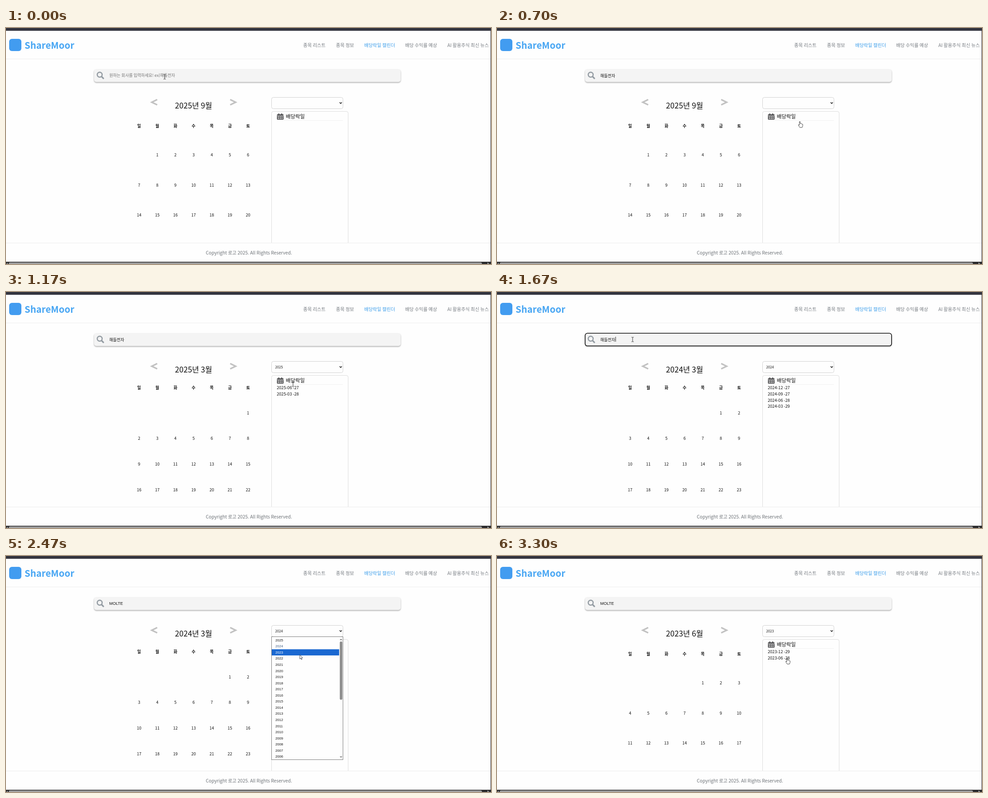
Animation of 1073x522 px, one loop 3.37 s. Source, as an HTML page with a canvas:

```html
<!DOCTYPE html>
<html lang="ko">
<head>
<meta charset="utf-8">
<title>배당락일 캘린더</title>
<style>
  html, body { margin: 0; width: 100%; height: 100%; overflow: hidden; background: #fefefe; }
  canvas { display: block; width: 100vw; height: 100vh; }
</style>
</head>
<body>
<canvas id="stage" width="1073" height="522"></canvas>
<script>
const ctx = document.getElementById('stage').getContext('2d');
const W = 1073, H = 522, LOOP = 3370;
const KR = '"Noto Sans CJK KR", "Noto Sans CJK", "Noto Sans", sans-serif';
const ARIAL = '"Liberation Sans", "Noto Sans CJK KR", sans-serif';
const FOOT = 475;

const BRAND = 'ShareMoor';
const COMPANY_A = '해들전자', COMPANY_B = 'MOLTE';
const LIST_A = ['해들전자', '해들물산', '해들생명', '해들화재', '해들카드'];
const LIST_B = ['GMZ금융지주', COMPANY_B, 'MQ투자증권', 'MQ하늘숲리츠', 'MEDO'];

const years = (from, skip) =>
  Array.from({ length: 24 }, (_, i) => from - i).filter(y => !skip.includes(y)).slice(0, 20);
const YEARS_A = { items: years(2025, []), thumb: 129 };
const YEARS_B = { items: years(2025, [2024, 2010]), thumb: 218 };

const DATES_2025 = ['2025-06 -27', '2025-03 -28'];
const DATES_2024 = ['2024-12 -27', '2024-09 -27', '2024-06 -28', '2024-03 -29'];
const DATES_B = ['2025-02 -27'];
const DATES_2023 = ['2023-12 -29', '2023-06 -28'];

const at = (kind, x, y) => ({ kind, x, y });

// Each entry changes some of the state; the rest carries over.
const timeline = [
  [0, { query: '', focus: false, hints: null, year: '', dates: [], month: [2025, 9],
        options: null, hover: 0, old: 0, mouse: at('text', 351, 108) }],
  [70, { focus: true }],
  [140, { query: 'ㅎ', mouse: null }],
  [210, { query: '해', hints: LIST_A }],
  [280, { query: '해들' }],
  [350, { query: '해들저' }],
  [420, { query: COMPANY_A }],
  [490, { mouse: at('arrow', 318, 112) }],
  [560, { mouse: at('hand', 300, 132) }],
  [630, { focus: false, hints: null, mouse: at('arrow', 500, 172) }],
  [700, { mouse: at('hand', 670, 207) }],
  [770, { year: '2025', dates: DATES_2025, mouse: at('hand', 641, 210) }],
  [900, { month: [2025, 6] }],
  [970, { mouse: at('hand', 637, 222) }],
  [1040, { month: [2025, 3] }],
  [1170, { mouse: at('text', 635, 204) }],
  [1240, { options: YEARS_A, hover: 2025, mouse: at('arrow', 650, 172) }],
  [1300, { hover: 2024, mouse: at('arrow', 650, 197) }],
  [1370, { options: null, year: '2024', dates: DATES_2024 }],
  [1440, { mouse: at('hand', 640, 247) }],
  [1500, { month: [2024, 3] }],
  [1600, { mouse: at('arrow', 500, 150) }],
  [1670, { focus: true, mouse: at('text', 300, 105) }],
  [1730, { query: '', mouse: at('arrow', 120, 102) }],
  [1800, { mouse: at('arrow', -4, 94) }],
  [1930, { query: 'M', hints: LIST_B }],
  [2060, { query: 'MO' }],
  [2190, { mouse: at('hand', 240, 157) }],
  [2260, { query: COMPANY_B, focus: false, hints: null, mouse: at('arrow', 300, 158) }],
  [2330, { mouse: at('arrow', 590, 165) }],
  [2400, { options: YEARS_A, hover: 2024, mouse: at('arrow', 650, 188) }],
  [2470, { hover: 2023, old: 2024, mouse: at('arrow', 650, 218.5) }],
  [2540, { options: null, old: 0, year: '2025', dates: DATES_B }],
  [2610, { mouse: at('hand', 640, 209) }],
  [2680, { month: [2025, 2] }],
  [2750, { mouse: at('arrow', 647, 172) }],
  [2820, { options: YEARS_B, hover: 2025, mouse: at('arrow', 650, 184) }],
  [2880, { mouse: at('arrow', 650.5, 196.5) }],
  [2950, { hover: 2023 }],
  [3020, { options: null, year: '2023', dates: DATES_2023, mouse: at('hand', 642, 209) }],
  [3090, { month: [2023, 12] }],
  [3160, { mouse: at('hand', 642, 226) }],
  [3230, { month: [2023, 6] }]
];

function stateAt(t) {
  return Object.assign({}, ...timeline.filter(([start]) => start <= t).map(([, patch]) => patch));
}

// y is the middle of the glyphs.
function label(str, x, y, size, color = '#111', { align = 'left', font = KR, weight = 400 } = {}) {
  ctx.font = `${weight} ${size}px ${font}`;
  ctx.textAlign = align;
  ctx.fillStyle = color;
  ctx.fillText(str, x, y + size * 0.36);
}

function rect(x, y, w, h, color) {
  ctx.fillStyle = color;
  ctx.fillRect(x, y, w, h);
}

function box(x, y, w, h, r, fill, stroke, line = 1) {
  ctx.beginPath();
  ctx.roundRect(x, y, w, h, r);
  if (fill) { ctx.fillStyle = fill; ctx.fill(); }
  if (stroke) { ctx.strokeStyle = stroke; ctx.lineWidth = line; ctx.stroke(); }
}

function path(points, { fill, stroke, line = 1, close = false }) {
  ctx.beginPath();
  points.forEach(([x, y]) => ctx.lineTo(x, y));
  if (close) ctx.closePath();
  if (fill) { ctx.fillStyle = fill; ctx.fill(); }
  if (stroke) { ctx.strokeStyle = stroke; ctx.lineWidth = line; ctx.stroke(); }
}

function triangle(x, y, dir, color = '#808080') {
  path([[x - 3, y + 1.5 * dir], [x + 3, y + 1.5 * dir], [x, y - 1.5 * dir]], { fill: color });
}

function shadowed(draw, color, blur, dy) {
  ctx.save();
  ctx.shadowColor = color;
  ctx.shadowBlur = blur;
  ctx.shadowOffsetY = dy;
  draw();
  ctx.restore();
}

function drawHeader() {
  rect(0, 68, W, 1, '#eeeeee');
  box(7, 24, 27, 27, 6, '#429cf0');
  label(BRAND, 41, 38.5, 20.4, '#48a6f3', { weight: 700 });
  const menu = [['종목 리스트', 657.5], ['종목 정보', 730], ['배당락일 캘린더', 792.5],
                ['배당 수익률 예상', 883], ['AI 활용주식 최신 뉴스', 976.5]];
  menu.forEach(([name, x], i) => label(name, x, 38, 10.25, i === 2 ? '#3f9fea' : '#777c82'));
}

function drawFrame() {
  rect(0, 0, W, 6, '#34353f');
  rect(0, 6, W, 1, '#d9d9dc');
  rect(1072, 0, 1, H, '#34353f');
  rect(0, 517, W, 5, '#2b2b2d');
  box(6, 518.5, 1047, 6, 3, '#9f9f9f');
  path([[1065, 518.5], [1069, 521], [1065, 523.5]], { fill: '#9f9f9f' });
  path([[4, 519], [1, 521], [4, 523]], { fill: '#9f9f9f' });
}

function drawFooter() {
  rect(0, FOOT, W, 42, '#fefefe');
  rect(0, FOOT, W, 1, '#ececec');
  label('Copyright 로고 2025. All Rights Reserved.', 537.5, 497, 10.2, '#6d7277', { align: 'center' });
}

function drawSearch(s) {
  shadowed(() => box(195, 91.5, 678, 28, 5, '#f4f4f4'), 'rgba(0,0,0,.35)', 3, 1.5);
  if (s.focus) box(195, 91.3, 678, 28, 5, '#f4f4f4', '#101010', 1.6);

  ctx.strokeStyle = '#959da4';
  ctx.lineWidth = 2.6;
  ctx.beginPath();
  ctx.arc(207.3, 103.3, 5.4, 0, Math.PI * 2);
  ctx.stroke();
  path([[211, 107], [216.3, 112.3]], { stroke: '#959da4', line: 3.2 });

  if (!s.query) {
    label('원하는 회사를 입력하세요! ex)' + COMPANY_A, 228.5, 104.5, 9, '#757575');
    ctx.font = `9px ${ARIAL}`;
  } else {
    const latin = s.query < '~';
    label(s.query, 228.5, latin ? 104.5 : 105.5, 9, '#111', { font: ARIAL });
  }
  if (s.focus) {
    rect(Math.round(228.5 + ctx.measureText(s.query).width), 99, 1, 11, '#222');
  }
}

function drawHints(items) {
  const rowH = 25.4, top = 120, bottom = 232;
  shadowed(() => box(195.5, top, 677, bottom - top, [0, 0, 4, 4], '#fefefe'), 'rgba(0,0,0,.4)', 4, 1);
  ctx.save();
  ctx.beginPath();
  ctx.rect(195, top, 678, bottom - top);
  ctx.clip();
  items.forEach((name, i) => {
    label(name, 201, 132.8 + i * rowH, 9);
    rect(196, Math.round(145 + i * rowH), 668, 1, '#f3f3f3');
  });
  box(865.5, 130, 5.5, 57.5, 2.7, '#8b8b8b');
  triangle(868.2, 125, 1);
  triangle(868.2, 226.5, -1);
  ctx.restore();
}

function drawCalendar([year, month]) {
  const first = new Date(year, month - 1, 1).getDay();
  const days = new Date(year, month, 0).getDate();
  const tall = Math.ceil((first + days) / 7) < 6;
  const [head, top, step] = tall ? [216.3, 281, 66.4] : [211.8, 267.6, 56.6];
  const colX = i => 294.5 + i * 40.17;

  path([[334.5, 158.3], [322.5, 164.2], [334.5, 170]], { stroke: '#c2c2c2', line: 3.4 });
  path([[496, 158.3], [508, 164.2], [496, 170]], { stroke: '#c2c2c2', line: 3.4 });
  label(`${year}년 ${month}월`, 415, 172.3, 17, '#111', { align: 'center' });
  [...'일월화수목금토'].forEach((d, i) => label(d, colX(i), head, 9, '#111', { align: 'center', weight: 700 }));
  for (let d = 1; d <= days; d++) {
    const cell = first + d - 1;
    const y = top + Math.floor(cell / 7) * step;
    if (y < FOOT) label(d, colX(cell % 7), y, 9, '#111', { align: 'center' });
  }
}

function drawPanel(s) {
  box(587.5, 153.5, 158, 25, 4, '#fefefe', '#d2d2d2');
  label(s.year, 595.5, 166, 7.6);
  path([[738, 164.5], [740.5, 167], [743, 164.5]], { stroke: '#111', line: 1.5 });

  box(587.5, 184.5, 169.5, 310, 4, '#fefefe', '#dcdcdc');
  drawCalendarIcon(599.5, 189);
  label('배당락일', 619, 196.2, 11.4);
  rect(599, 204, 146, 1, '#f1f1f1');
  s.dates.forEach((d, i) => label(d, 599, 212.2 + i * 13.6, 9.1));
}

function drawCalendarIcon(x, y) {
  const ink = '#4b4b4d';
  rect(x + 3, y, 2, 3, ink);
  rect(x + 9.5, y, 2, 3, ink);
  box(x, y + 1.8, 14.5, 12, 1.5, ink);
  rect(x, y + 4.5, 14.5, 0.9, '#fefefe');
  for (let i = 0; i < 6; i++) {
    rect(x + 2 + (i % 3) * 4, y + 6.8 + Math.floor(i / 3) * 3.4, 2.4, 1.9, '#fefefe');
  }
}

function drawOptions(s) {
  const { items, thumb } = s.options;
  rect(587.5, 179, 158, 271.5, '#fefefe');
  items.forEach((year, i) => {
    const y = 186 + i * 13.56, on = year === s.hover;
    if (on) rect(588, y - 6.8, 149, 13.6, '#1a68d1');
    label(year, 596, y, 7.6, on ? '#fff' : year === s.old ? '#3c5a80' : '#111', { font: ARIAL });
  });
  box(738.5, 189, 5.5, thumb, 2.7, '#8b8b8b');
  triangle(741.2, 184.5, 1);
  triangle(741.2, 444.7, -1);
  ctx.strokeStyle = '#7b7b7b';
  ctx.lineWidth = 1;
  ctx.strokeRect(587.5, 178.5, 158, 272);
}

const cursors = {
  text() {
    path([[-2.5, -5], [-0.5, -5], [0, -4.5], [0.5, -5], [2.5, -5]], { stroke: '#333' });
    path([[0, -4.5], [0, 4.5]], { stroke: '#333' });
    path([[-2.5, 5], [-0.5, 5], [0, 4.5], [0.5, 5], [2.5, 5]], { stroke: '#333' });
  },
  arrow() {
    path([[0, 0], [0, 9.3], [2.1, 7.4], [3.6, 10.6], [5, 10], [3.6, 6.8], [6.3, 6.6]],
      { fill: '#fff', stroke: '#343c4c', line: 0.9, close: true });
  },
  hand() {
    path([[-1, 0], [0.7, 0], [1, 4.5], [2.8, 4.4], [4.6, 5.2], [6.3, 6], [6.4, 9.5], [5, 13],
          [0, 13], [-2.2, 9.8], [-3.2, 7.2], [-2, 6.8], [-1, 8]],
      { fill: '#fff', stroke: '#333', line: 0.9, close: true });
  }
};

function drawMouse({ kind, x, y }) {
  ctx.save();
  ctx.translate(x, y);
  ctx.lineJoin = 'round';
  cursors[kind]();
  ctx.restore();
}

function render(t) {
  const s = stateAt(t);
  rect(0, 0, W, H, '#fefefe');
  drawHeader();
  drawCalendar(s.month);
  drawPanel(s);
  drawFooter();
  drawSearch(s);
  if (s.hints) drawHints(s.hints);
  if (s.options) drawOptions(s);
  drawFrame();
  if (s.mouse) drawMouse(s.mouse);
}

const begin = performance.now();
function tick() {
  render((performance.now() - begin) % LOOP);
  requestAnimationFrame(tick);
}
tick();
</script>
</body>
</html>
```
